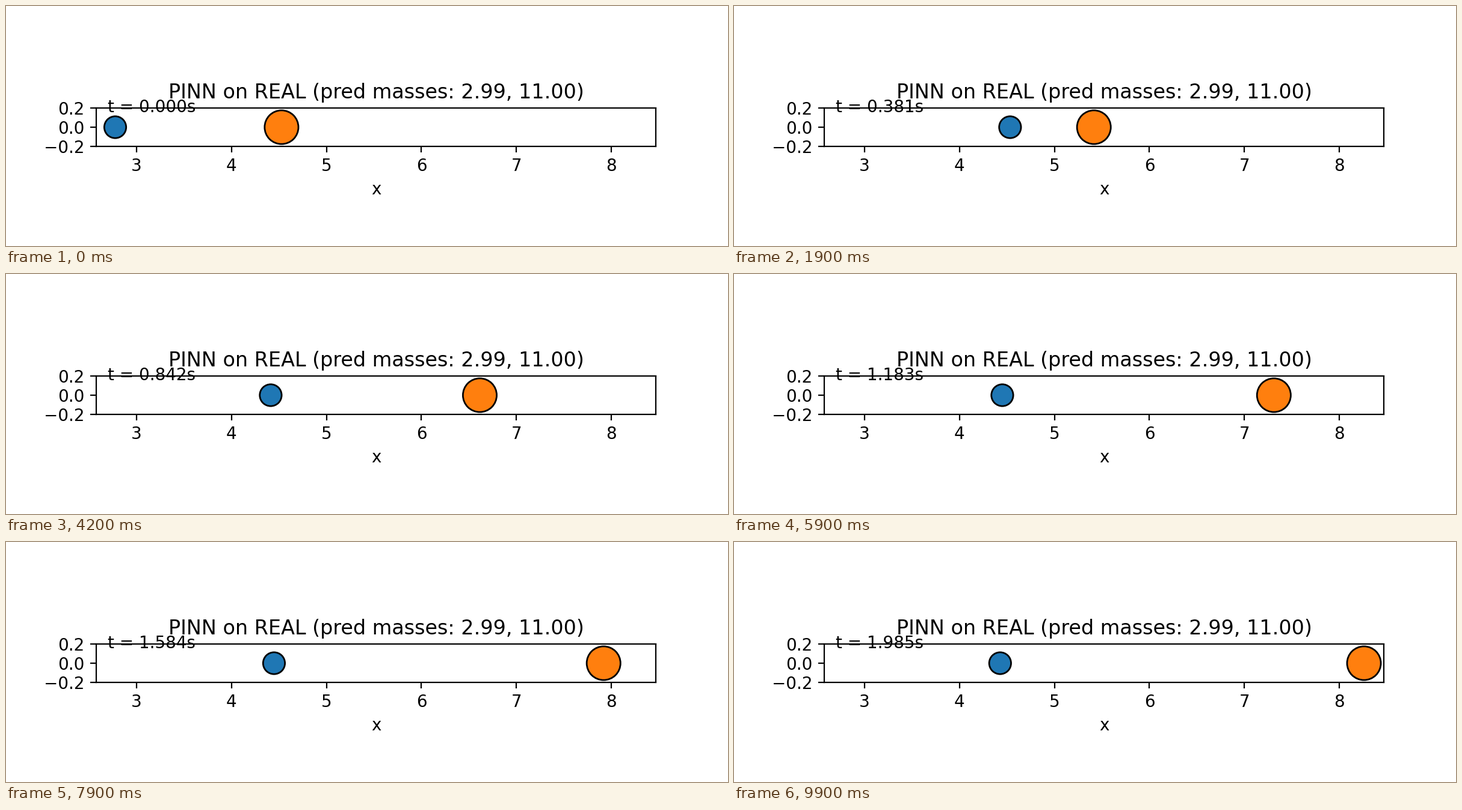
A matplotlib script for the animation above (10000 ms loop, 1200x400 px).

```python
import numpy as np
import matplotlib.pyplot as plt
from matplotlib.animation import FuncAnimation
from matplotlib.patches import Circle

FRAMES = 100
INTERVAL = 100          # ms
DT = 4 * 2.0 / 399      # every 4th of 400 samples over 2 s
MASSES = (2.99, 11.00)
COLORS = ("tab:blue", "tab:orange")

# key poses shared by both balls: approach, impact, glide
KEYS = np.array([0, 11, 19, 32, 42, 59, 79, 99])
LIGHT = np.array([2.774, 4.01, 4.532, 4.426, 4.412, 4.450, 4.447, 4.427])
HEAVY = np.array([4.526, 5.174, 5.415, 6.182, 6.615, 7.311, 7.919, 8.260])


def glide(x, n):
    """Cubic Hermite position at frame n through the key poses."""
    slope = np.gradient(x, KEYS, edge_order=2)
    i = min(np.searchsorted(KEYS, n, side="right") - 1, len(KEYS) - 2)
    h = KEYS[i + 1] - KEYS[i]
    s = (n - KEYS[i]) / h
    ease = s * s * (3 - 2 * s)
    bend = h * s * (1 - s) * ((1 - s) * slope[i] - s * slope[i + 1])
    return x[i] + (x[i + 1] - x[i]) * ease + bend


fig, ax = plt.subplots(figsize=(6, 2), dpi=200)
ax.set_xlim(2.5743, 8.469)
ax.set_ylim(-0.2, 0.2)
ax.set_aspect("equal")
ax.set_xticks(range(3, 9))
ax.set_yticks([-0.2, 0.0, 0.2])
ax.set_xlabel("x")
ax.set_title("PINN on REAL (pred masses: {:.2f}, {:.2f})".format(*MASSES))

balls = [
    ax.add_patch(Circle((0, 0), 0.08 * np.cbrt(m), fc=color, ec="black"))
    for m, color in zip(MASSES, COLORS)
]
clock = ax.text(0.02, 0.9, "", transform=ax.transAxes)


def update(n):
    for ball, x in zip(balls, (LIGHT, HEAVY)):
        ball.center = (glide(x, n), 0)
    clock.set_text(f"t = {n * DT:.3f}s")
    return (*balls, clock)


anim = FuncAnimation(fig, update, frames=FRAMES, interval=INTERVAL,
                     repeat=True, repeat_delay=0)
plt.show()
```
